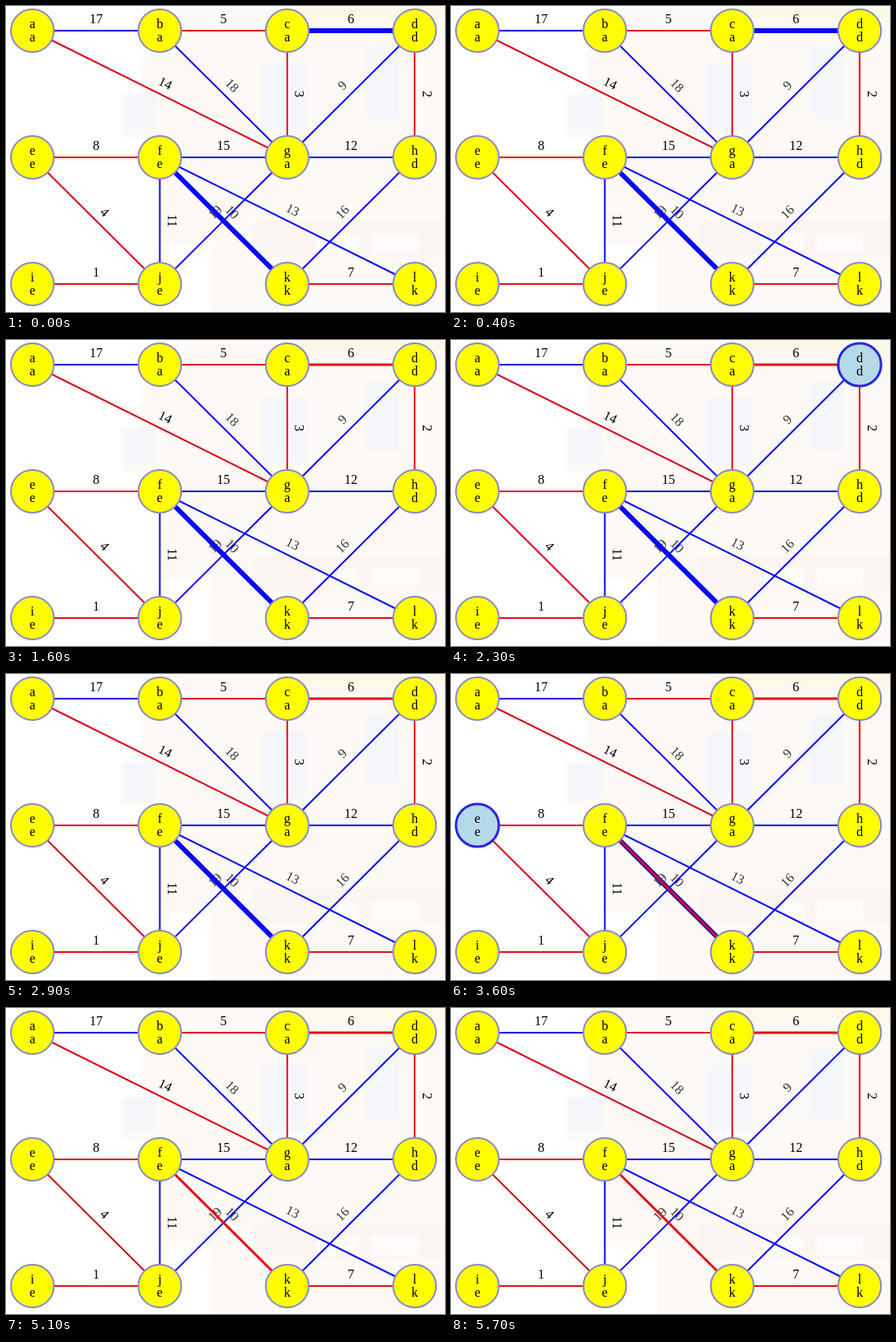
An HTML page for the animation above (5800 ms loop, 532 px wide and 372 px high).

```html
<!DOCTYPE html>
<html lang="en">
<head>
<meta charset="utf-8">
<title>Minimum spanning tree</title>
<style>
  html, body { margin: 0; width: 100%; height: 100%; overflow: hidden; background: #fff; }
  svg { display: block; width: 532px; height: 372px; }
  text { font: 16px "Liberation Serif", "Times New Roman", serif; text-anchor: middle; }
</style>
</head>
<body>
<svg id="stage" viewBox="0 0 532 372">
  <defs>
    <filter id="soft" x="-20%" y="-20%" width="140%" height="140%">
      <feGaussianBlur stdDeviation="2"/>
    </filter>
  </defs>
  <g filter="url(#soft)">
    <path d="M205 0H540V380H250V290H185V160H140V108H165V55H205Z" fill="#fcf9f6"/>
    <path d="M350 0H540V16H350Z" fill="#fcf8e8"/>
    <path d="M310 70H365V150H310ZM436 50H476V135H436ZM140 108H182V150H140Z" fill="#f5f6fa"/>
    <path d="M300 262H540V304H300Z" fill="#faf4f2"/>
    <path d="M375 278H428V300H375ZM442 276H500V300H442Z" fill="#fdfcfb"/>
  </g>
</svg>
<script>
const LOOP = 5800, FRAME = 100;
const FIRST = 500, PERIOD = 1300, HOLD = 650;
const ROOTS = ["a", "d", "e", "k"];
const BLUE = "#0a0aee", RED = "#e60f16", DIAGONAL_RED = "#d4081e";

const stage = document.getElementById("stage");

function add(parent, tag, attrs, content = "") {
  const el = document.createElementNS("http://www.w3.org/2000/svg", tag);
  set(el, attrs);
  el.textContent = content;
  parent.append(el);
  return el;
}

function set(el, attrs) {
  for (const key in attrs) el.setAttribute(key, attrs[key]);
}

const labels = add(stage, "g", {});
const lines = add(stage, "g", {});
const circles = add(stage, "g", {});

// Each pair is a node name followed by its component name.
const nodes = {};
"aa ba ca dd ee fe ga hd ie je kk lk".split(" ").forEach(([name, component], i) => {
  const x = 32 + (i % 4) * 154.4, y = 30 + Math.floor(i / 4) * 154;
  const circle = add(circles, "circle", { cx: x, cy: y, r: 26 });
  add(circles, "text", { x, y: y - 3.5 }, name);
  add(circles, "text", { x, y: y + 12.5 }, component);
  nodes[name] = { x, y, circle };
});

function addEdge(ends, weight, inTree) {
  const p = nodes[ends[0]], q = nodes[ends[1]];
  const angle = Math.atan2(q.y - p.y, q.x - p.x) * 180 / Math.PI;
  const slanted = p.x !== q.x && p.y !== q.y;
  const place = { x1: p.x, y1: p.y, x2: q.x, y2: q.y };
  add(labels, "text", {
    y: -9.5,
    transform: `translate(${(p.x + q.x) / 2} ${(p.y + q.y) / 2}) rotate(${angle})`,
    fill: slanted && !inTree ? "#333" : "#000"
  }, weight);
  const stroke = !inTree ? BLUE : slanted ? DIAGONAL_RED : RED;
  const base = add(lines, "line", { ...place, stroke, "stroke-width": 2 });
  return { place, base };
}

"ag14 bc5 cg3 dh2 ef8 ej4 ij1 kl7".split(" ")
  .forEach(s => addEdge(s, s.slice(2), true));
"ab17 bg18 gd9 fg15 gh12 fj11 jg19 kh16 fl13".split(" ")
  .forEach(s => addEdge(s, s.slice(2), false));

// Cheapest edges joining two components, with the turn that selects each.
const joins = [["cd", 6, 0], ["fk", 10, 2]].map(([ends, weight, turn]) => {
  const { place, base } = addEdge(ends, weight, false);
  return { base, core: add(lines, "line", place), start: FIRST + turn * PERIOD };
});

function render(time) {
  const t = Math.floor((time % LOOP) / FRAME) * FRAME;

  const turn = Math.floor((t - FIRST) / PERIOD);
  const active = t >= FIRST && (t - FIRST) % PERIOD < HOLD ? ROOTS[turn] : "";
  for (const name in nodes) {
    const on = name === active;
    set(nodes[name].circle, {
      fill: on ? "#b5d9e8" : "#ffff00",
      stroke: on ? "#2929db" : "#8a88c4",
      "stroke-width": on ? 3 : 2
    });
  }

  for (const { base, core, start } of joins) {
    const chosen = t >= start, settled = t >= start + HOLD;
    set(base, {
      stroke: settled ? RED : chosen ? "#1a10b0" : BLUE,
      "stroke-width": settled ? 3 : 6
    });
    set(core, {
      stroke: "#c4103c",
      "stroke-width": 3,
      visibility: chosen && !settled ? "visible" : "hidden"
    });
  }
}

const begin = performance.now();
function tick() {
  render(performance.now() - begin);
  requestAnimationFrame(tick);
}
tick();
</script>
</body>
</html>
```
